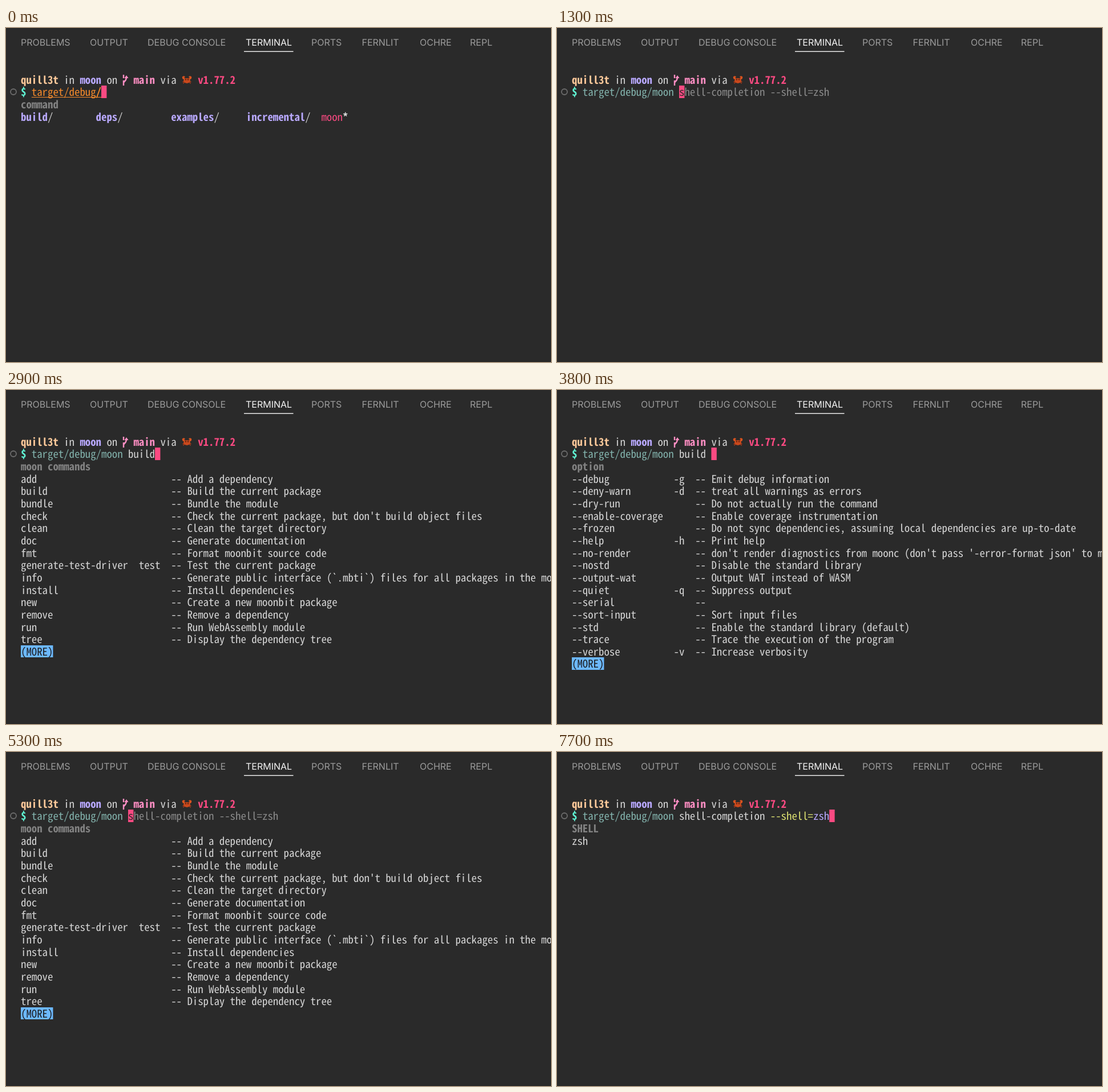
These frames come from a looping animation (955 by 586 pixels, 8 s). An HTML page with a canvas:

```html
<!DOCTYPE html>
<html lang="en">
<head>
<meta charset="utf-8">
<title>Terminal completion</title>
<style>
  html, body { margin: 0; width: 100%; height: 100%; overflow: hidden; background: #2a2a2a; }
  canvas { display: block; }
</style>
</head>
<body>
<canvas id="stage" width="955" height="586"></canvas>
<script>
const ctx = document.getElementById('stage').getContext('2d');
const LOOP = 8000, LEFT = 26, TOP = 79.6, CELL = 9.4, LINE = 21.66;
const BG = '#2a2a2a', TEXT = '#d6d6d6', GREY = '#828282', PINK = '#fb4a82',
  LAVENDER = '#b9a9ff', ORANGE = '#f58a2b', TEAL = '#83b3ad', YELLOW = '#dfe372';
const MONO = '"Noto Sans Mono CJK JP", "Noto Sans Mono CJK SC", "Noto Sans Mono", monospace';

// Pick the font size whose advance equals one terminal cell
ctx.font = `100px ${MONO}`;
const SIZE = 100 * CELL / ctx.measureText('0').width;
ctx.textRendering = 'geometricPrecision';

const x = col => LEFT + col * CELL;
const y = row => TOP + row * LINE;

function box(row, col, cells, color) {
  ctx.fillStyle = color;
  const top = Math.round(y(row));
  ctx.fillRect(x(col), top, cells * CELL, Math.round(y(row + 1)) - top);
}

// Writes text on the grid and returns the column after it
function put(row, col, text, color = TEXT, bold = false) {
  ctx.font = `${bold ? 'bold ' : ''}${SIZE}px ${MONO}`;
  ctx.fillStyle = color;
  for (const ch of text) {
    if (ch !== ' ') ctx.fillText(ch, x(col), y(row) + 18);
    col++;
  }
  return col;
}

function putSelected(row, col, text) {
  box(row, col, text.length, TEXT);
  put(row, col, text, BG);
}

const tabs = [['PROBLEMS', 26], ['OUTPUT', 147], ['DEBUG CONSOLE', 248], ['TERMINAL', 420],
  ['PORTS', 535], ['FERNLIT', 623.5], ['OCHRE', 725], ['REPL', 813]];

function drawTabs() {
  ctx.font = '16px Inter, "Liberation Sans", sans-serif';
  for (const [name, left] of tabs) {
    ctx.fillStyle = name === 'TERMINAL' ? '#f4f4f4' : '#9b9b9b';
    ctx.fillText(name, left, 31);
  }
  ctx.fillStyle = '#e8e8e8';
  ctx.fillRect(417, 40.5, 86.5, 1.5);
}

function stroke(path, color, width) {
  ctx.strokeStyle = color;
  ctx.lineWidth = width;
  ctx.stroke(new Path2D(path));
}

function fill(path, color) {
  ctx.fillStyle = color;
  ctx.fill(new Path2D(path));
}

function drawBranch() {
  stroke('M206 82V88M206 92V101M206 97C206 93 211 94 211 86', '#ff8fc4', 2.4);
  fill('M207.5 88L211 83L214.5 88Z', '#ff8fc4');
}

function drawCrab() {
  stroke('M312 93L309.5 95M312.5 95L310.5 97.5M322 93L324.5 95M321.5 95L323.5 97.5', '#a83a18', 1.4);
  fill('M309 88a2.6 2.6 0 0 1 5 -2l-2 1 2 1.5a2.6 2.6 0 0 1 -5 -.5zM325 88a2.6 2.6 0 0 0 -5 -2l2 1 -2 1.5a2.6 2.6 0 0 0 5 -.5z', '#d9531f');
  fill('M311 92.5a6 4.4 0 0 1 12 0a6 4.4 0 0 1 -12 0z', '#c9481c');
  fill('M314.2 89.4h1.7v2h-1.7zM318.1 89.4h1.7v2h-1.7z', '#3a1a10');
}

function drawPrompt() {
  put(0, 0, 'quill3t', '#ffc99a', true);
  put(0, 8, 'in');
  put(0, 11, 'moon', LAVENDER, true);
  put(0, 16, 'on');
  drawBranch();
  put(0, 21, 'main', '#ff8fc4', true);
  put(0, 26, 'via');
  drawCrab();
  put(0, 33, 'v1.77.2', PINK, true);
  put(1, 0, '$', '#5ff2d2', true);
  stroke('M8 112a5 5 0 0 1 10 0a5 5 0 0 1 -10 0', '#6c6c6c', 1.8);
}

const DIR = 'target/debug/', TOOL = DIR + 'moon';
const HISTORY = TOOL + ' shell-completion --shell=zsh';

function drawCommand(typed) {
  let col = 2;
  if (typed.startsWith(TOOL)) {
    col = put(1, col, TOOL, TEAL);
    for (const word of typed.slice(TOOL.length).split(/( )/)) {
      if (!word.startsWith('--')) { col = put(1, col, word); continue; }
      const cut = word.indexOf('=') + 1 || word.length;
      col = put(1, col, word.slice(0, cut), YELLOW);
      col = put(1, col, word.slice(cut), LAVENDER);
    }
  } else {
    col = put(1, col, typed.slice(0, -1), ORANGE);
    col = put(1, col, '/', ORANGE, true);
    ctx.fillStyle = ORANGE;
    ctx.fillRect(x(2), 121, x(col) - x(2), 1);
  }
  const ghost = typed.startsWith(TOOL + ' ') && HISTORY.startsWith(typed)
    ? HISTORY.slice(typed.length) : '';
  put(1, col, ghost, '#8b8b8b');
  box(1, col, 1, PINK);
  put(1, col, ghost.slice(0, 1), BG);
}

const files = ['build/', 'deps/', 'examples/', 'incremental/', 'moon*'];

const commands = `add|Add a dependency
build|Build the current package
bundle|Bundle the module
check|Check the current package, but don't build object files
clean|Clean the target directory
doc|Generate documentation
fmt|Format moonbit source code
generate-test-driver  test|Test the current package
info|Generate public interface (\`.mbti\`) files for all packages in the module
install|Install dependencies
new|Create a new moonbit package
remove|Remove a dependency
run|Run WebAssembly module
tree|Display the dependency tree`.split('\n').map(line => {
  const [name, about] = line.split('|');
  return name.padEnd(28) + '-- ' + about;
});

const options = `debug|-g|Emit debug information
deny-warn|-d|treat all warnings as errors
dry-run||Do not actually run the command
enable-coverage||Enable coverage instrumentation
frozen||Do not sync dependencies, assuming local dependencies are up-to-date
help|-h|Print help
no-render||don't render diagnostics from moonc (don't pass '-error-format json' to moonc)
nostd||Disable the standard library
output-wat||Output WAT instead of WASM
quiet|-q|Suppress output
serial||
sort-input||Sort input files
std||Enable the standard library (default)
trace||Trace the execution of the program
verbose|-v|Increase verbosity
jobs|-j|Set the max number of jobs to run in parallel
source-dir|-C|The source code directory. Defaults to the current directory
target||Select output target
target-dir||The target directory. Defaults to \`source-dir/target\``.split('\n').map(line => {
  const [name, short, about] = line.split('|');
  return ('--' + name).padEnd(19) + short.padEnd(4) + '-- ' + about;
});

const title = text => put(2, 0, text, GREY, true);

function drawRows(rows, picked, more) {
  rows.forEach((text, i) => (i === picked ? putSelected : put)(3 + i, 0, text));
  if (!more) return;
  const row = 3 + rows.length;
  box(row, 0, 6, '#6cb8ff');
  put(row, 0, '(MORE)', '#1c1c1c');
}

const lists = {
  files(picked) {
    title('command');
    files.forEach((file, i) => {
      const col = i * 14, name = file.slice(0, -1), mark = file.slice(-1), exe = mark === '*';
      if (i === picked) putSelected(3, col, file);
      else put(3, put(3, col, name, exe ? PINK : LAVENDER, !exe), mark, TEXT, exe);
    });
  },
  commands() {
    title('moon commands');
    drawRows(commands, -1, true);
  },
  options(picked = -1) {
    title('option');
    const menu = picked >= 0;
    drawRows(menu ? options : options.slice(0, 15), picked, !menu);
  },
  shell() {
    title('SHELL');
    drawRows(['zsh'], -1, false);
  }
};

// [start ms, command line, open list, selected entry]
const steps = [
  [0, DIR, 'files'],
  [100, DIR + 'build/', 'files', 0],
  [300, DIR + 'deps/', 'files', 1],
  [500, DIR + 'examples/', 'files', 2],
  [700, DIR + 'incremental/', 'files', 3],
  [900, TOOL, 'files', 4],
  [1000, TOOL + ' '],
  [1700, TOOL + ' ', 'commands'],
  ...[...'build'].map((_, i) => [2500 + i * 100, TOOL + ' ' + 'build'.slice(0, i + 1), 'commands']),
  [3000, TOOL + ' build ', 'commands'],
  [3200, TOOL + ' build ', 'options'],
  [4000, TOOL + ' build --debug', 'options', 0],
  [4100, TOOL + ' build --deny-warn', 'options', 1],
  [4500, TOOL + ' build --deny-warn'],
  [4700, TOOL + ' build '],
  [4900, TOOL + ' '],
  [5200, TOOL + ' ', 'commands'],
  [6200, TOOL + ' s', 'commands'],
  [6300, TOOL + ' sh', 'commands'],
  [6400, TOOL + ' she', 'commands'],
  [6600, TOOL + ' shell-completion '],
  [7300, HISTORY],
  [7500, HISTORY, 'shell']
];

function draw(time) {
  const [, typed, list, picked] = steps.findLast(step => step[0] <= time);
  ctx.fillStyle = BG;
  ctx.fillRect(0, 0, 955, 586);
  stroke('M.5 .5H954.5V585.5H.5Z', '#242424', 1);
  drawTabs();
  drawPrompt();
  drawCommand(typed);
  if (list) lists[list](picked);
}

const start = performance.now();
function tick() {
  draw((performance.now() - start) % LOOP);
  requestAnimationFrame(tick);
}
tick();
</script>
</body>
</html>
```
